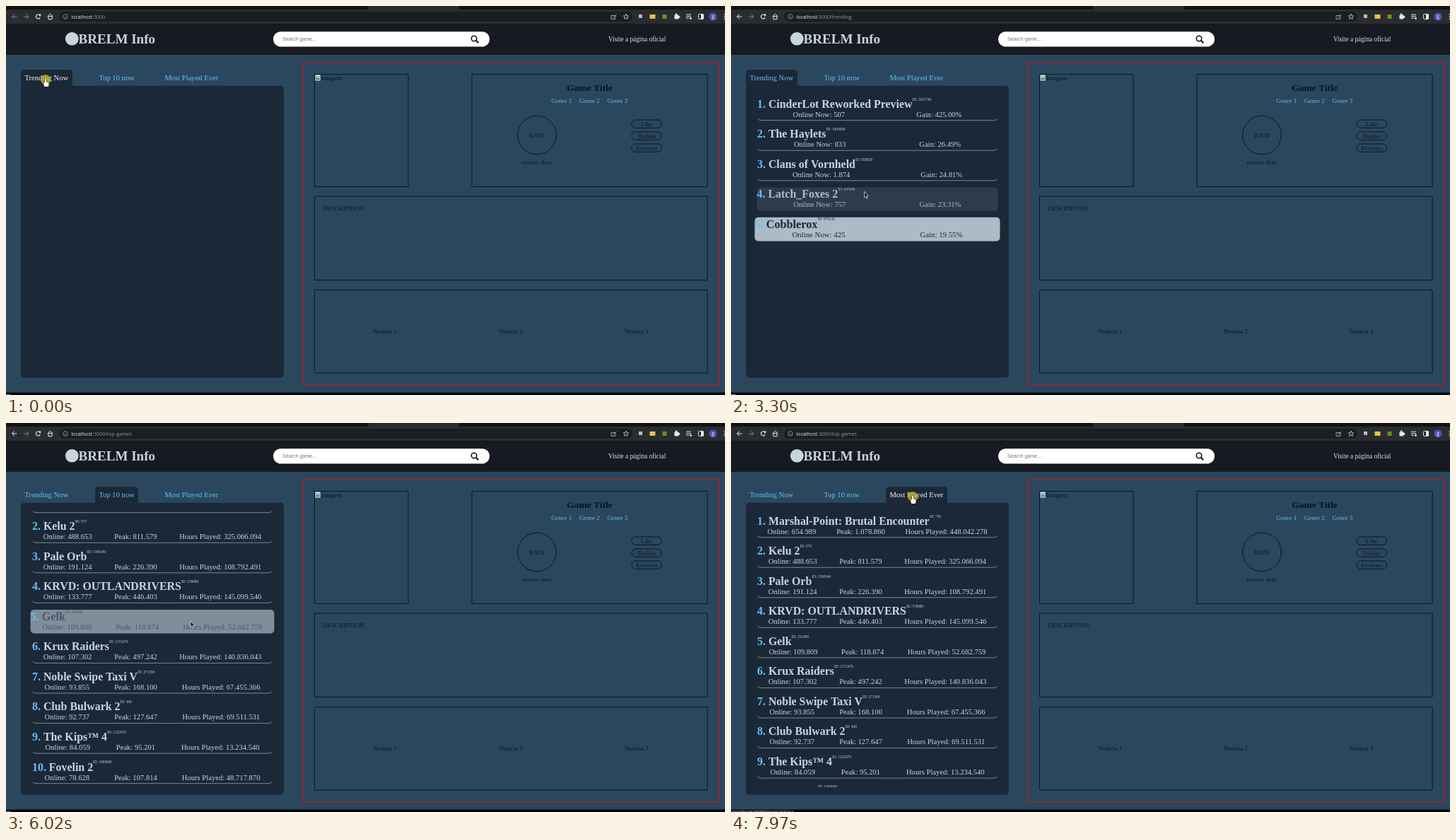
Write an HTML page with a canvas that moves like this. It is 1017 px wide and 550 px high and loops after 8000 ms.

```html
<!DOCTYPE html>
<html lang="pt">
<head>
<meta charset="utf-8">
<title>Game info</title>
<style>
html, body { margin: 0; width: 100%; height: 100%; overflow: hidden; background: #2a475e; }
canvas { display: block; width: 1017px; height: 550px; }
</style>
</head>
<body>
<canvas id="stage"></canvas>
<script>
const W = 1017, H = 550, LOOP = 8000;
const canvas = document.getElementById('stage');
const ratio = window.devicePixelRatio || 1;
canvas.width = W * ratio;
canvas.height = H * ratio;
const c = canvas.getContext('2d');

const SERIF = '"Liberation Serif", "Times New Roman", serif';
const SANS = '"Liberation Sans", Arial, sans-serif';
const UI = '"Open Sans", "Noto Sans", sans-serif';
const DARK = [27, 40, 56], LIGHT = [199, 213, 224];
const PANEL = '#1b2838', BLUE = '#66c0f4', PALE = '#c7d5e0', INK = '#0b1620';

// Each line: name | id | stats in the order of the labels
function parse(lines, labels, unit = '') {
  return lines.trim().split('\n').map(l => {
    const [name, id, ...values] = l.trim().split('|');
    return { name, id, stats: values.map((v, i) => `${labels[i]}: ${v}${i === 1 ? unit : ''}`) };
  });
}
const TRENDING = parse(`
  CinderLot Reworked Preview|1611740|507|425.00
  The Haylets|1009560|833|26.49
  Clans of Vornheld|858820|1.874|24.81
  Latch_Foxes 2|447040|757|23.31
  Cobblerox|979120|425|19.55`, ['Online Now', 'Gain'], '%');
const TOP = parse(`
  Marshal-Point: Brutal Encounter|730|654.989|1.078.860|448.042.278
  Kelu 2|570|488.653|811.579|325.066.094
  Pale Orb|1599340|191.124|226.390|108.792.491
  KRVD: OUTLANDRIVERS|578080|133.777|446.403|145.099.546
  Gelk|252490|109.809|118.874|52.682.759
  Krux Raiders|1172470|107.302|497.242|140.836.043
  Noble Swipe Taxi V|271590|93.855|168.100|67.455.366
  Club Bulwark 2|440|92.737|127.647|69.511.531
  The Kips™ 4|1222670|84.059|95.201|13.234.540
  Fovelin 2|1085660|78.628|107.814|48.717.870`, ['Online', 'Peak', 'Hours Played']);

const TABS = [
  { label: 'Trending Now', x: 21, w: 73 },
  { label: 'Top 10 now', x: 126, w: 61 },
  { label: 'Most Played Ever', x: 219, w: 87 }
];

// Eased pointer moves: begin, end, target x, target y
const HOME = [56, 103];
const MOVES = [
  [300, 1100, 409, 140], [1640, 2520, 170, 255.5], [2550, 2900, 200, 320],
  [3161, 3575, 157, 103], [4140, 4265, 185, 128.5], [4650, 5050, 250, 128.5],
  [5238, 5838, 261, 280], [6150, 6430, 257, 302], [6690, 7000, 262, 390],
  [7150, 7680, 257, 103]
];
const NOTCH = 35;
const ROW_TOP = 129, PITCH = 42.55, ROW_H = 33, LEFT = 37, WIDTH = 340, FADE = 400, STEP = 5;

const clamp = v => Math.max(0, Math.min(1, v));
const ramp = (t, a, b) => { const k = clamp((t - a) / (b - a)); return k * k * (3 - 2 * k); };
const mix = (a, b, k) => `rgb(${a.map((v, i) => Math.round(v + (b[i] - v) * k))})`;
const scrollAt = t => NOTCH * (ramp(t, 5700, 5850) - ramp(t, 7430, 7560));
const rowY = (i, t) => ROW_TOP + PITCH * i - scrollAt(t);

function pointerAt(t) {
  return MOVES.reduce(([x, y], [a, b, tx, ty]) => {
    const k = ramp(t, a, b);
    return [x + (tx - x) * k, y + (ty - y) * k];
  }, HOME);
}

function listAt(t) {
  if (t < 890 || (t >= 4000 && t < 4620)) return null;
  return t < 4000 ? TRENDING : TOP;
}

// Hover strength of every row, stepped once along the pointer path
function traceHover() {
  const log = [];
  let p = TOP.map(() => 0);
  for (let t = 0; t <= LOOP; t += STEP) {
    const list = listAt(t), [x, y] = pointerAt(t);
    p = p.map((v, i) => {
      if (!list || i >= list.length) return 0;
      const dy = y - rowY(i, t);
      const over = x > LEFT && x < LEFT + WIDTH && dy > 0 && dy < ROW_H;
      return clamp(v + (over ? STEP : -STEP) / FADE);
    });
    log.push(p);
  }
  return log;
}
const hover = traceHover();

function text(s, x, y, size, color, align = 'left', family = SERIF, weight = '') {
  c.font = `${weight} ${size}px ${family}`;
  c.fillStyle = color;
  c.textAlign = align;
  c.fillText(s, x, y);
  return c.measureText(s).width;
}
function box(x, y, w, h, color) { c.fillStyle = color; c.fillRect(x, y, w, h); }
function round(x, y, w, h, r, color) {
  c.beginPath(); c.roundRect(x, y, w, h, r); c.fillStyle = color; c.fill();
}
function frame(x, y, w, h, color, r = 0, width = 1) {
  c.beginPath(); c.roundRect(x, y, w, h, r); c.strokeStyle = color; c.lineWidth = width; c.stroke();
}
function disc(x, y, r, color) { c.beginPath(); c.arc(x, y, r, 0, 7); c.fillStyle = color; c.fill(); }
function line(color, width, ...pts) {
  c.beginPath();
  pts.forEach(([x, y]) => c.lineTo(x, y));
  c.strokeStyle = color; c.lineWidth = width; c.stroke();
}
function arc(x, y, r, a, b, color, width) {
  c.beginPath(); c.arc(x, y, r, a, b); c.strokeStyle = color; c.lineWidth = width; c.stroke();
}

function arrow(x, d, color) {
  const tip = x + 3.5 * d;
  line(color, 1, [x - 3.5 * d, 15], [tip, 15]);
  line(color, 1, [x, 11.7], [tip, 15], [x, 18.3]);
}

function star(x, y, r, color) {
  c.beginPath();
  for (let i = 0; i < 10; i++) {
    const d = i % 2 ? r * 0.43 : r, a = (i / 5 - 0.5) * Math.PI;
    c.lineTo(x + d * Math.cos(a), y + d * Math.sin(a));
  }
  c.closePath();
  c.strokeStyle = color; c.lineWidth = 0.8; c.stroke();
}

function drawBrowser(t) {
  const on = '#e6e8ea', off = '#808387';
  box(0, 0, W, 6, '#111214');
  round(512, -4, 129, 12, 3, '#2b2c2f');
  box(0, 5, W, 20, '#2b2c2f');
  round(75, 8, 811, 14, 7, '#1c1d20');

  arrow(12, -1, t < 70 ? off : on);
  arrow(28.5, 1, off);
  arc(45.5, 15, 3, 0.4, 5.6, on, 1.1);
  box(47, 11.5, 2.2, 2.8, on);
  line(on, 1, [58.5, 15], [62.5, 11.2], [66.5, 15]);
  frame(60, 14.5, 5, 4.3, on);
  arc(84, 15, 3.3, 0, 7, '#a3a6aa', 0.8);
  line('#a3a6aa', 0.9, [84, 14.5], [84, 17]);

  const path = t < 70 ? ':3000' : t < 4000 ? ':3000/trending' : ':3000/top-games';
  const w = text('localhost', 92.3, 17.5, 7.1, '#e8eaed', 'left', UI);
  text(path, 92.3 + w, 17.5, 7.1, '#94979b', 'left', UI);

  frame(856, 13.5, 6, 5, '#b9bcc0', 0, 0.8);
  line('#b9bcc0', 0.9, [858.5, 16.5], [863.5, 12]);
  star(877, 15.2, 4, '#d5d7da');
  box(895, 12, 5, 5, '#b9bcc0');
  box(910.5, 12, 8, 6, '#e3c34a');
  box(928.5, 12, 6, 6, '#6f8f2a');
  round(945.5, 12.5, 6, 6, 1, on);
  disc(948, 12, 1.4, on);
  disc(952, 15.5, 1.4, on);
  for (let i = 0; i < 3; i++) {
    line(on, 1, [962, 12.2 + 2.5 * i], [i < 2 ? 969 : 966, 12.2 + 2.5 * i]);
    disc(1016.3, 12 + 3 * i, 0.8, on);
  }
  disc(968.5, 17.5, 1.4, on);
  frame(979.5, 11.5, 7, 7, on, 1);
  box(983, 11.5, 3.5, 7, on);
  disc(1000, 15, 5.6, '#4a55b8');
  text('g', 1000, 17, 6.5, '#fff', 'center', UI);
}

function drawHeader() {
  box(0, 25, W, 44, '#171a21');
  disc(93.3, 46.3, 9.4, PALE);
  text('BRELM Info', 102.4, 53, 19.1, PALE, 'left', SERIF, 'bold');
  round(378, 36.2, 306, 21.4, 10.7, '#fff');
  text('Search game...', 391, 49.4, 7.07, '#757575', 'left', SANS);
  arc(662, 46, 3.7, 0, 7, '#111', 1.6);
  line('#111', 2, [664.8, 48.8], [668.2, 52.2]);
  text('Visite a página oficial', 852, 50, 9.3, '#dde6ec');
}

function drawDetails() {
  frame(420, 80, 589, 456, '#e0101a', 0, 1.2);
  frame(436.5, 96.5, 132.5, 159, INK);
  frame(659, 96.5, 333, 159, INK);
  frame(436.5, 269, 555.5, 118.5, INK);
  frame(436.5, 401.5, 555.5, 117.5, INK);

  box(437.5, 97.5, 7, 8, '#e8eef2');
  box(438.3, 99, 5.4, 3, '#8fb5e0');
  box(438.3, 102, 5.4, 2.5, '#4f9a4a');
  text('Imagem', 446, 105, 9, INK);

  text('Game Title', 825.5, 119.7, 13.5, '#0a121a', 'center', SERIF, 'bold');
  arc(751, 182.5, 27.3, 0, 7, INK, 1);
  text('RATE', 751, 185.5, 9, INK, 'center');
  text('review desc', 750.6, 223.7, 9, INK, 'center');
  text('DESCRIPTION', 448, 288.5, 9, INK);
  ['Like', 'Dislike', 'Reviews'].forEach((s, i) => {
    text('Genre ' + (i + 1), 771.3 + 39.6 * i, 136.8, 9.05, BLUE);
    frame(885, 161 + i * 17, 42.5, 11.3, INK, 5.6);
    text(s, 906.2, 169.6 + i * 17, 9, INK, 'center');
    text('Noticia ' + (i + 1), 536.4 + 177.7 * i, 463, 9, INK, 'center');
  });
}

function overTab(b, x, y) { return x > b.x && x < b.x + b.w && y > 90 && y < 113; }

function drawTabs(t, x, y) {
  const tab = TABS[t < 3930 ? 0 : t < 7950 ? 1 : 2];
  round(21, 112.7, 372, 412.8, 5, PANEL);
  round(tab.x, 90, tab.w, 24, [5, 5, 0, 0], PANEL);
  TABS.forEach(b => text(b.label, b.x + 5.4, 104.6, 10.6, overTab(b, x, y) ? '#f2f5f7' : BLUE));
}

function underline() {
  const r = LEFT + WIDTH;
  c.beginPath();
  c.moveTo(LEFT + 0.8, 30.2);
  c.quadraticCurveTo(LEFT + 1.8, 32.6, LEFT + 5, 32.7);
  c.lineTo(r - 5, 32.7);
  c.quadraticCurveTo(r - 1.8, 32.6, r - 0.8, 30.2);
  c.strokeStyle = PALE; c.lineWidth = 0.55; c.stroke();
}

function drawRow(row, i, y, p) {
  const mid = LEFT + WIDTH / 2, s = 1 + 0.024 * p;
  const ink = mix(LIGHT, DARK, clamp(p * 1.25));
  c.save();
  c.translate(mid, y + ROW_H / 2);
  c.scale(s, s);
  c.translate(-mid, -ROW_H / 2);
  if (p > 0) round(LEFT, 0, WIDTH, ROW_H, 5, `rgba(${LIGHT},${p})`);
  if (p < 0.05) underline();

  let x = LEFT + text(`${i + 1}. `, LEFT, 14.6, 15.9, BLUE, 'left', SERIF, 'bold');
  x += text(row.name, x, 14.6, 15.9, ink, 'left', SERIF, 'bold');
  text('ID: ' + row.id, x, 4.5, 5.3, ink);

  c.font = `10.6px ${SERIF}`;
  const widths = row.stats.map(v => c.measureText(v).width);
  const pad = (WIDTH - widths.reduce((a, b) => a + b)) / (2 * widths.length);
  x = LEFT + pad;
  row.stats.forEach((v, k) => {
    text(v, x, 27.6, 10.6, ink);
    x += widths[k] + 2 * pad;
  });
  c.restore();
}

function drawList(t) {
  const list = listAt(t);
  if (!list) {
    if (t >= 70) drawLoader(t);
    return;
  }
  const p = hover[Math.floor(t / STEP)];
  c.save();
  c.beginPath(); c.rect(22, 124.5, 370, 390.5); c.clip();
  list.forEach((row, i) => drawRow(row, i, rowY(i, t), p[i]));
  c.restore();
}

function drawLoader(t) {
  const a = -0.6 + (t - 4260) / 1000 * 2 * Math.PI;
  arc(176, 319, 7.4, 0, 7, '#17222f', 1.4);
  arc(176, 319, 7.4, a - 0.78, a + 0.78, BLUE, 1.5);
  text('Carregando...', 189, 323, 10.6, '#f4f6f8');
}

function drawStatus(w, top, s) {
  box(0, top, w, H - top, '#1f2023');
  text(s, 2, 553, 6.7, '#c5c8cb', 'left', UI);
}

function drawFooter(t) {
  box(0, 546.5, W, 4, '#050608');
  box(0, 549, 6, 1, '#8b8d90');
  if (t >= 3760 && t < 4480) drawStatus(342, 545.3, 'localhost:3000/t');
  if (t >= 7895) drawStatus(84, 547, 'localhost:3000/most-played');
}

function drawPointer(t, x, y) {
  const pressed = t < 200 || (t >= 3900 && t < 4080) || t >= 7950;
  if (pressed) disc(x, y + 1, 7, 'rgba(205,190,30,0.72)');
  c.save();
  c.translate(x, y);
  if (TABS.some(b => overTab(b, x, y))) {
    frame(-1, 0, 2, 7, '#222', 1);
    frame(-2.5, 4.5, 7, 6.5, '#222', 2);
    round(-1, 0, 2, 7, 1, '#fff');
    round(-2.5, 4.5, 7, 6.5, 2, '#fff');
  } else {
    c.beginPath();
    [[0, 0], [0, 8.5], [1.9, 6.8], [3.2, 9.9], [4.6, 9.3], [3.3, 6.3], [5.8, 6.2]].forEach(q => c.lineTo(...q));
    c.closePath();
    c.fillStyle = '#14181d'; c.fill();
    c.strokeStyle = '#d9dde0'; c.lineWidth = 0.8; c.stroke();
  }
  c.restore();
}

function draw(t) {
  const [x, y] = pointerAt(t);
  c.setTransform(ratio, 0, 0, ratio, 0, 0);
  box(0, 0, W, H, '#2a475e');
  drawBrowser(t);
  drawHeader();
  drawDetails();
  drawTabs(t, x, y);
  drawList(t);
  drawFooter(t);
  drawPointer(t, x, y);
}

const start = performance.now();
function tick() {
  draw((performance.now() - start) % LOOP);
  requestAnimationFrame(tick);
}
tick();
</script>
</body>
</html>
```
